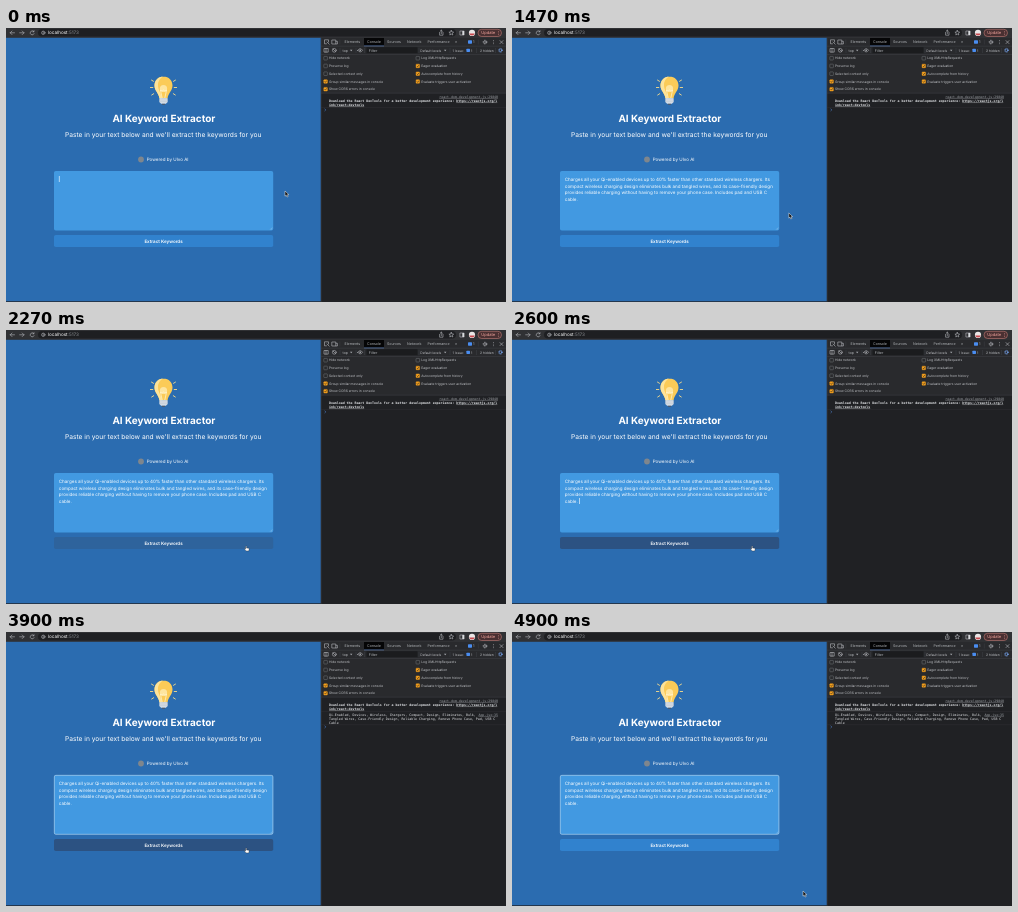
These frames come from a looping animation (500x274 px, 5330 ms). An HTML page:

```html
<!DOCTYPE html>
<html lang="en">
<head>
<meta charset="utf-8">
<title>AI Keyword Extractor</title>
<style>
html, body { margin: 0; width: 100%; height: 100%; overflow: hidden; background: #202124; }
svg { display: block; width: 500px; height: 274px; }
text { font-family: Inter, "Open Sans", sans-serif; text-rendering: geometricPrecision; white-space: pre; }
.white { fill: #fff; }
.mid { text-anchor: middle; }
.end { text-anchor: end; }
.body { font-size: 4.54px; fill: #fff; }
.tab { font-size: 3.6px; fill: #b4b7bb; }
.opt { font-size: 3.3px; fill: #c0c3c7; }
.mono { font-family: "DejaVu Sans Mono", monospace; font-size: 3.264px; fill: #e3e5e8; }
.link { text-decoration: underline; fill: #9da1a6; }
.icon { fill: none; stroke: #b5b8bc; stroke-width: .6; stroke-linecap: round; stroke-linejoin: round; }
.rule { fill: none; stroke: #46484c; stroke-width: .4; }
</style>
</head>
<body>
<svg id="stage" viewBox="0 0 500 274">
  <rect width="500" height="274" fill="#202124"/>

  <g id="browser">
    <rect width="500" height="10" fill="#303134"/>
    <rect x="32" y="1" width="418" height="7.6" rx="3.8" fill="#1e1f22"/>
    <path class="icon" d="M8.5 4.8H4.2M6 3L4.2 4.8 6 6.6M13.7 4.8h4.3M16.2 3l1.8 1.8-1.8 1.8M27.8 3.6a2 2 0 1 0 .3 2M28 2.6v1.2h-1.2"/>
    <circle class="icon" cx="37.3" cy="4.8" r="1.7"/>
    <path class="icon" d="M37.3 4.7v1M37.3 3.8v.1"/>
    <text x="42" y="6.4" font-size="4.6" class="white">localhost<tspan fill="#8f9398">:5173</tspan></text>
    <path class="icon" d="M433.6 4.4v2.8h3.4v-2.8M435.3 5.6V2.2M434.2 3.2l1.1-1 1.1 1"/>
    <path class="icon" d="M445.3 2.4l.7 1.6 1.7.2-1.3 1.1.4 1.7-1.5-.9-1.5.9.4-1.7-1.3-1.1 1.7-.2z"/>
    <rect class="icon" x="454.3" y="3" width="3.8" height="4"/>
    <rect x="456.3" y="3" width="1.8" height="4" fill="#d8dadd"/>
    <circle cx="466" cy="4.9" r="3.1" fill="#e9e6e6"/>
    <path d="M463.2 5.6h5.6a3 3 0 0 1-5.6 0z" fill="#c7474d"/>
    <rect x="472" y="1.3" width="23.5" height="7.2" rx="3.6" fill="#4a3032" stroke="#d98880" stroke-width=".5"/>
    <text x="482.2" y="6.3" font-size="4.1" class="mid" fill="#f2a59d">Update</text>
    <g fill="#f2a59d"><circle cx="492.4" cy="3.4" r=".4"/><circle cx="492.4" cy="4.9" r=".4"/><circle cx="492.4" cy="6.4" r=".4"/></g>
  </g>

  <g id="page">
    <rect y="9.8" width="314.8" height="263.5" fill="#2b6cb0"/>
    <g id="bulb">
      <path d="M147.5 53.3l-2-1.2M146.8 59.5h-2.4M147.7 65.7l-2 1.3M167.5 53.3l2-1.2M168.2 59.5h2.4M167.3 65.7l2 1.3" stroke="#f7dc8c" stroke-width=".9" stroke-linecap="round"/>
      <path d="M157.5 48.6c-5.4 0-9 4-9 9 0 5.4 4.2 7.3 4.9 12.6h8.2c.7-5.3 4.9-7.2 4.9-12.6 0-5-3.6-9-9-9z" fill="#fbcb58"/>
      <path d="M157.5 48.6c-5.4 0-9 4-9 9 0 5.4 4.2 7.3 4.9 12.6h2.4c-1-6.2-3.8-8.2-3.8-13 0-4.2 2.2-7.2 5.5-8.6z" fill="#fde39a"/>
      <circle cx="157.5" cy="60.5" r="3.6" fill="#fff0bd" opacity=".7"/>
      <path d="M156.2 70l-1.8-8 1.7 1.2 1.4-1.2 1.4 1.2 1.7-1.2-1.8 8" fill="none" stroke="#fff6d6" stroke-width=".7"/>
      <path d="M153.4 70.2h8.2v3.8l-1.7 1.8h-4.8l-1.7-1.8z" fill="#e6ebf1"/>
      <path d="M153.4 72h8.2M153.6 73.9h7.8" stroke="#97a4b5" stroke-width=".6"/>
      <path d="M155.6 75.8h3.8l-.9 1.2h-2z" fill="#4c5a6d"/>
    </g>
    <text x="157.9" y="93.8" class="white mid" font-size="9.97" font-weight="700">AI Keyword Extractor</text>
    <text x="157.2" y="109" class="white mid" font-size="6.65">Paste in your text below and we'll extract the keywords for you</text>
    <circle cx="135" cy="131.5" r="2.9" fill="#7f868d"/>
    <text x="140.7" y="133.2" class="body">Powered by Ulvo AI</text>
    <rect x="48" y="143" width="219.2" height="59.6" rx="1.8" fill="#4299e1"/>
    <rect id="border" x="48.3" y="143.3" width="218.6" height="59" rx="1.6" fill="none" stroke="#e2e8f0" stroke-width=".6" opacity="0"/>
    <path d="M264.2 201.6l2-2M265.4 201.6l.8-.8" stroke="#d5e6f5" stroke-width=".3"/>
    <g id="pasted"></g>
    <rect id="caret" width=".6" height="6" fill="#fff"/>
    <rect id="button" x="48" y="207" width="219.2" height="12" rx="1.8" fill="#3182ce"/>
    <text x="157.5" y="214.7" class="white mid" font-size="4.5" font-weight="600">Extract Keywords</text>
  </g>

  <g id="devtools">
    <rect x="315" y="10" width="185" height="55.2" fill="#292a2d"/>
    <rect x="358" y="10" width="20" height="8" fill="#050506"/>
    <path class="rule" d="M315 18.2h185M315 26.5h185M315 65.2h185M315.2 10v264"/>
    <path d="M358 17.9h20" stroke="#7cacf8" stroke-width=".5"/>
    <path class="icon" d="M322.5 14v-2.2h-4v4h2M321 14l2.2 2.2M326.2 12h3.6v4h-3.6zM330 13.3h1.4v2.7H330"/>
    <path class="rule" d="M333.8 11.5v5M472.3 11.5v5M334 20v5M350 20v5M358.5 20v5M413 20v5M444 20v5M470.5 20v5M489.5 20v5"/>
    <text x="450" y="15.4" class="tab mid">»</text>
    <rect x="462" y="12.3" width="4" height="3.4" rx=".6" fill="#4a8df0"/>
    <text x="467" y="15.3" class="tab">1</text>
    <path class="icon" d="M494 12.6l3 3M497 12.6l-3 3"/>
    <g id="gears"></g>
    <g fill="#b5b8bc"><circle cx="487.5" cy="12.5" r=".45"/><circle cx="487.5" cy="14.1" r=".45"/><circle cx="487.5" cy="15.7" r=".45"/></g>

    <rect class="icon" x="318.4" y="20.5" width="3.8" height="3.6"/>
    <path class="icon" d="M320 20.5v3.6M326.9 20.9l2.7 2.7"/>
    <circle class="icon" cx="328.3" cy="22.3" r="1.9"/>
    <path class="icon" d="M351.8 22.3q2.4-3.4 4.8 0q-2.4 3.4-4.8 0z"/>
    <circle cx="354.2" cy="22.3" r=".8" fill="#b5b8bc"/>
    <rect x="360.5" y="19.2" width="51" height="6" fill="#1b1c1e"/>
    <text x="362.8" y="23.6" class="tab">Filter</text>
    <text x="336.5" y="23.6" class="tab">top</text>
    <path d="M344 21.7h2.4l-1.2 1.6zM438 21.7h2.4l-1.2 1.6z" fill="#a9adb2"/>
    <text x="414.3" y="23.5" class="opt">Default levels</text>
    <text x="446.5" y="23.5" class="opt">1 Issue:</text>
    <rect x="460.4" y="20.7" width="3.6" height="3.2" rx=".6" fill="#4a8df0"/>
    <text x="465" y="23.5" class="opt">1</text>
    <text x="474" y="23.5" class="opt">2 hidden</text>
    <g id="options"></g>

    <text x="492" y="69.6" class="mono link end">react-dom.development.js:29840</text>
    <g font-weight="700">
      <text x="323" y="73.7" class="mono white">Download the React DevTools for a better development experience: <tspan text-decoration="underline">https://reactjs.org/l</tspan></text>
      <text x="323" y="77.7" class="mono white" text-decoration="underline">ink/react-devtools</text>
    </g>
    <path d="M315 79.6h185" stroke="#3a3c3f" stroke-width=".3"/>
    <g id="log">
      <text x="492" y="83.7" class="mono link end">App.jsx:35</text>
      <path d="M315 92.7h185" stroke="#3a3c3f" stroke-width=".3"/>
    </g>
    <path id="prompt" d="M318.6 80.8l1.2 1.1-1.2 1.1" fill="none" stroke="#5b9bf5" stroke-width=".5"/>
  </g>

  <g id="pointer">
    <path id="arrow" d="M0 0v5.2l1.2-1.1.8 1.9 1.1-.5-.8-1.8h1.6z" fill="#111" stroke="#fff" stroke-width=".45" stroke-linejoin="round"/>
    <path id="hand" d="M0 .5q.5-.8.9 0v1.6l2 .4q.7.2.5 1l-.4 1.6H.4L-1 3.4q-.2-.8.5-.6l.5.4z" fill="#fff" stroke="#222" stroke-width=".35" stroke-linejoin="round"/>
  </g>
</svg>
<script>
const LOOP = 5330, FRAME = 1000 / 30;
const $ = id => document.getElementById(id);

function add(parent, tag, attrs, content = '') {
  const el = document.createElementNS('http://www.w3.org/2000/svg', tag);
  for (const k in attrs) el.setAttribute(k, attrs[k]);
  el.textContent = content;
  return $(parent).appendChild(el);
}

[
  'Charges all your Qi-enabled devices up to 40% faster than other standard wireless chargers. Its',
  'compact wireless charging design eliminates bulk and tangled wires, and its case-friendly design',
  'provides reliable charging without having to remove your phone case. Includes pad and USB C',
  'cable.'
].forEach((line, i) => add('pasted', 'text', { x: 52.8, y: 153.1 + i * 6.5, class: 'body' }, line));

[
  'Qi-Enabled, Devices, Wireless, Chargers, Compact, Design, Eliminates, Bulk,',
  'Tangled Wires, Case-Friendly Design, Reliable Charging, Remove Phone Case, Pad, USB C',
  'Cable'
].forEach((line, i) => add('log', 'text', { x: 323, y: 83.7 + i * 4, class: 'mono' }, line));

[['Elements', 338.6], ['Console', 361], ['Sources', 381], ['Network', 401], ['Performance', 421.5]]
  .forEach(([name, x]) => add('devtools', 'text',
    { x, y: 15.4, class: name === 'Console' ? 'tab white' : 'tab' }, name));

[[479, 14.1, '#b5b8bc'], [494.5, 22.3, '#7cacf8']].forEach(([cx, cy, color]) => {
  const style = `stroke: ${color}`;
  add('gears', 'circle', { cx, cy, r: 1.3, class: 'icon', style });
  add('gears', 'circle', { cx, cy, r: 1.9, class: 'icon', style, 'stroke-dasharray': '.1 1.39' });
});

function option(label, x, row, on) {
  const y = 30.2 + row * 7.75;
  add('options', 'rect', { x, y: y - 1.8, width: 3.6, height: 3.6, rx: .6,
    fill: on ? '#f5a01d' : 'none', stroke: on ? '#f5a01d' : '#85888c', 'stroke-width': .4 });
  if (on) add('options', 'path', { d: `M${x + .8} ${y}l.8.9 1.4-1.8`, fill: 'none', stroke: '#222', 'stroke-width': .6 });
  add('options', 'text', { x: x + 5.2, y: y + 1.2, class: 'opt' }, label);
}
['Hide network', 'Preserve log', 'Selected context only', 'Group similar messages in console', 'Show CORS errors in console']
  .forEach((label, i) => option(label, 317.8, i, i > 2));
['Log XMLHttpRequests', 'Eager evaluation', 'Autocomplete from history', 'Evaluate triggers user activation']
  .forEach((label, i) => option(label, 410, i, i > 0));

// Pointer tip: time, x, y
const path = [
  [0, 279, 163], [1250, 279, 163], [1467, 276.8, 185], [1767, 264.5, 231], [1880, 264.5, 231],
  [2067, 252, 226], [2230, 239.7, 215.8], [4420, 239.7, 215.8], [4430, 240.1, 216.3],
  [4570, 240.1, 216.3], [4633, 265.6, 244.5], [4740, 282, 255], [4900, 291, 259], [LOOP, 291, 259]
];
// The caret toggles at each of these times, starting visible
const blinks = [30, 300, 530, 800, 1270, 1500, 1760, 2000, 2230, 2600, 2900];

const ramp = (t, from, to) => Math.min(1, Math.max(0, (t - from) / (to - from)));
const easeOut = p => 1 - (1 - p) ** 2;
const mix = (a, b, p) => `rgb(${a.map((v, i) => Math.round(v + (b[i] - v) * p))})`;
const show = (id, on) => $(id).setAttribute('visibility', on ? 'visible' : 'hidden');

function draw(t) {
  const i = Math.max(1, path.findIndex(k => k[0] >= t));
  const [t0, x0, y0] = path[i - 1], [t1, x1, y1] = path[i];
  const p = ramp(t, t0, t1);
  $('pointer').setAttribute('transform', `translate(${x0 + (x1 - x0) * p} ${y0 + (y1 - y0) * p})`);
  const onButton = t > 2190 && t < 4590;
  show('hand', onButton);
  show('arrow', !onButton);

  const pasted = t >= 995;
  show('pasted', pasted);
  $('caret').setAttribute('x', pasted ? 67.3 : 52.9);
  $('caret').setAttribute('y', pasted ? 168 : 148);
  show('caret', t < 3060 && blinks.filter(b => t >= b).length % 2 === 0);

  $('border').setAttribute('opacity', .75 * easeOut(ramp(t, 3040, 3230)));
  const hover = easeOut(ramp(t, 2180, 2390)) - easeOut(ramp(t, 4570, 4720));
  $('button').setAttribute('fill', mix([49, 130, 206], [44, 82, 130], hover));

  const logged = t >= 3895;
  show('log', logged);
  $('prompt').setAttribute('transform', `translate(0 ${logged ? 13 : 0})`);
}

const start = performance.now();
function tick() {
  const t = (performance.now() - start) % LOOP;
  draw(Math.min(LOOP, Math.floor((t + 4) / FRAME) * FRAME));
  requestAnimationFrame(tick);
}
tick();
</script>
</body>
</html>
```
